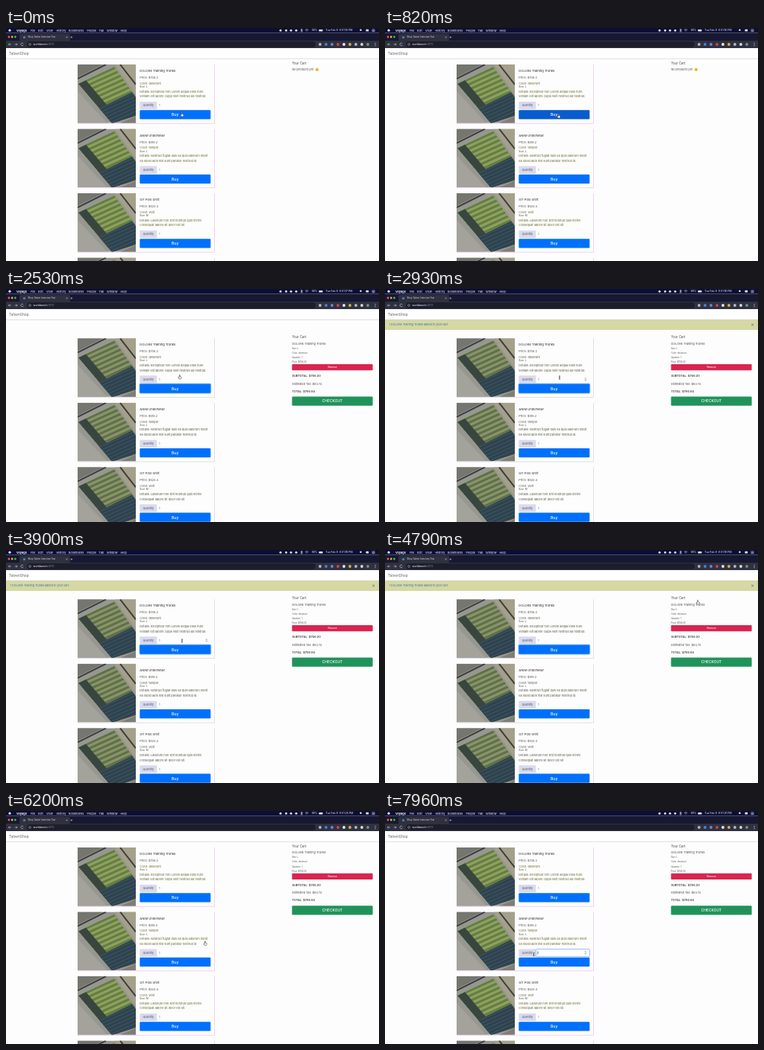
Recreate the animation shown at these times as an HTML page. Size 500 by 313 pixels, loop 8 s.

```html
<!DOCTYPE html>
<html lang="en">
<head>
<meta charset="utf-8">
<title>Shop</title>
<style>
  html, body { margin: 0; width: 100%; height: 100%; overflow: hidden; background: #fdfdfd; }
  svg { display: block; width: 100%; height: 100%; font-family: Inter, Roboto, sans-serif; }
  text { white-space: pre; }
  #page { --edge: #d9d9de; --detail: #575842; --cloth: #87936a; --stripe: #606f45; }
  #page.tinted { --edge: #efc4ee; --detail: #66672f; --cloth: #8ca063; --stripe: #667d3d; }
  .edge { stroke: var(--edge); }
  .detail { fill: var(--detail); }
  .cloth { fill: var(--cloth); }
  .stripe { stroke: var(--stripe); }
</style>
</head>
<body>
<svg id="stage" viewBox="0 0 500 313">
  <defs>
    <clipPath id="frame"><rect width="78" height="78.5"/></clipPath>
    <clipPath id="fabric"><path d="M1 26L49 3L78 44V69L46 79Z"/></clipPath>
    <g id="photo" clip-path="url(#frame)">
      <rect width="78" height="79" fill="#969791"/>
      <path d="M0 0H34L0 17Z" fill="#74766f"/>
      <path d="M50 0H78V40Z" fill="#a5a08a"/>
      <path d="M0 19L38 0M57 0L78 27" stroke="#3d3f3c" stroke-width="2"/>
      <path d="M0 36L40 79H0Z" fill="#a3a29b"/>
      <g clip-path="url(#fabric)">
        <rect class="cloth" width="78" height="79"/>
        <path id="bands" class="stripe" stroke-width="3"/>
        <path d="M1 26L11 21L60 79H46Z" fill="#38463f"/>
        <path d="M24 61L78 35V79H40Z" fill="#2d4352"/>
        <path id="threads" stroke="#4d5d5a" stroke-width=".8"/>
      </g>
      <path d="M57 79L78 70V79Z" fill="#7f7e75"/>
    </g>
  </defs>
  <g id="page"><g id="items"></g><g id="cart"></g></g>
  <g id="alert"></g>
  <g id="bars"></g>
  <g id="pointer"></g>
</svg>
<script>
const LOOP = 8000, SHIFT = 17.3;
const PRODUCT = "DOLORE Training Trunks";
const $ = id => document.getElementById(id);

function add(parent, tag, attrs, content) {
  const el = document.createElementNS("http://www.w3.org/2000/svg", tag);
  for (const key in attrs) el.setAttribute(key, attrs[key]);
  if (content !== undefined) el.textContent = content;
  return parent.appendChild(el);
}
const group = (parent, attrs = {}) => add(parent, "g", attrs);
const rect = (parent, x, y, width, height, fill, more = {}) =>
  add(parent, "rect", { x, y, width, height, fill, ...more });
const dot = (parent, cx, cy, r, fill) => add(parent, "circle", { cx, cy, r, fill });
const line = (parent, d, stroke, width = .6, more = {}) =>
  add(parent, "path", { d, stroke, "stroke-width": width, fill: "none", ...more });
// y is the vertical middle of the capitals
const label = (parent, x, y, words, size = 3.9, fill = "#50504f", more = {}) =>
  add(parent, "text", { x, y: y + size * .36, "font-size": size, fill, ...more }, words);
const centered = { "text-anchor": "middle", "font-weight": 500 };
const show = (el, on) => el.setAttribute("visibility", on ? "visible" : "hidden");
const ramp = (t, start, length) => Math.min(1, Math.max(0, (t - start) / length));

let bands = "", threads = "";
for (let i = 0; i < 14; i++) {
  bands += `M-4 ${8 + i * 7}L82 ${-31 + i * 7}`;
  threads += `M22 ${63 + i * 5}L80 ${37 + i * 5}`;
}
$("bands").setAttribute("d", bands);
$("threads").setAttribute("d", threads);

function spinner(parent, y) {
  return line(parent, `M267.8 ${y - .6}l1 -1.2l1 1.2M267.8 ${y + .6}l1 1.2l1 -1.2`, "#555");
}

function productCard(index, [name, price, color, size, first, second]) {
  const card = group($("items"), { transform: `translate(0 ${49 + index * 86.5})` });
  line(card, "M96 79.2H279.5V0", "", .8, { class: "edge" });
  add(card, "use", { href: "#photo", x: 96, y: 0 });
  label(card, 179.3, 8.6, name, 4.1, "#494949", { "font-weight": 500 });
  label(card, 179.3, 17.6, "Price: " + price);
  label(card, 179.3, 25.5, "Color: " + color, 3.9, "", { class: "detail" });
  label(card, 179.3, 30, "Size: " + size, 3.3);
  label(card, 179.3, 36.2, "Details: " + first, 3.9, "", { class: "detail" });
  label(card, 179.3, 42.8, second, 3.9, "", { class: "detail" });
  rect(card, 179.3, 50, 23, 10.2, "#d9daf0", { rx: .8 });
  label(card, 190.8, 55, "Quantity", 3.7, "#555550", { "text-anchor": "middle" });
  const focus = rect(card, 202.4, 50, 72, 10.2, "#fff", { stroke: "#86b7fe", "stroke-width": .9, rx: .8 });
  const caret = line(card, "M204.6 53v4.4", "#222", .5);
  label(card, 205, 55, "1", 3.7, "", { class: "detail" });
  const arrows = spinner(card, 55);
  const ring = rect(card, 178.3, 60.3, 97, 14.2, "#9cc8ff", { rx: 1.8 });
  const button = rect(card, 179.3, 61.3, 95, 12.2, "#0070fb", { rx: 1.2 });
  label(card, 226.7, 67.5, "Buy", 5.1, "#fff", centered);
  [focus, caret, arrows, ring].forEach(el => show(el, false));
  return { focus, caret, arrows, ring, button };
}

const cards = [
  [PRODUCT, "$706.2", "deserunt", "L", "Excepteur non Lorem aliqua esse irure", "veniam elit labore culpa velit nostrud ad nostrud."],
  ["ANIM Underwear", "$516.2", "tempor", "L", "Nostrud fugiat duis ea quis laborum mollit", "ea eiusd aute nisi sunt pariatur nostrud id."],
  ["SIT Polo Shirt", "$523.4", "velit", "M", "Laborum non sint nostrud quis minim", "consequat labore sit dolor est sit."],
  ["", "", "", "", "", ""]
].map((data, i) => productCard(i, data));

const cart = $("cart");
label(cart, 383.4, 47.6, "Your Cart", 4.3, "#444");
const emptyCart = group(cart);
label(emptyCart, 383.4, 56, "No products yet", 3.8);
dot(emptyCart, 417, 55.8, 2.2, "#f0c64a");
line(emptyCart, "M415.8 56.3q1.2 1.5 2.4 0M416.2 55v.3M417.8 55v.3", "#7d5b20", .4);

const filledCart = group(cart);
label(filledCart, 383.4, 56, PRODUCT, 3.9);
["Size: L", "Color: deserunt", "Quantity: 1", "Price: $706.20"].forEach((words, i) =>
  label(filledCart, 383.4, 62.2 + i * 6.2, words, 2.8));
rect(filledCart, 383.4, 83.8, 108.2, 8.2, "#da2450", { rx: .8 });
label(filledCart, 437.5, 87.9, "Remove", 3.2, "#fff", centered);
label(filledCart, 383.4, 99.4, "SUBTOTAL: $706.20", 3.9, "#3f3f42", { "font-weight": 600 });
label(filledCart, 383.4, 110, "Estimated Tax: $84.74", 3.8);
label(filledCart, 383.4, 120, "TOTAL: $790.94", 3.9, "#3f3f42", { "font-weight": 600 });
rect(filledCart, 383.4, 127.2, 108.2, 12.3, "#20935a", { rx: 1.2 });
label(filledCart, 437.5, 133.4, "CHECKOUT", 4.9, "#fff", centered);

const notice = $("alert");
const noticeBack = rect(notice, 0, 41, 500, 14, "#d6d8a4");
const noticeText = label(notice, 5.5, 48, `1 ${PRODUCT} added to your cart.`, 3.7, "#32789c");
const closeFocus = rect(notice, 485.6, 41.6, 13.6, 12.8, "none", { stroke: "#6d8f9c", "stroke-width": .8, rx: 1 });
line(notice, "M491.2 46.6l2.8 2.8m0 -2.8l-2.8 2.8", "#4b6670", .7);

const bars = $("bars");
rect(bars, 0, 27, 500, 14, "#fff");
rect(bars, 0, 40.8, 500, .7, "#cfcfd2");
label(bars, 4, 34.2, "TalvenShop", 4.8, "#5a5a5a");
rect(bars, 0, 0, 500, 6.5, "#0d0e38");
rect(bars, 0, 6.5, 500, 10.5, "#171831");
rect(bars, 18, 8, 68, 9, "#30313e", { rx: 1.6 });
rect(bars, 0, 17, 500, 10, "#30313e");
rect(bars, 28, 18, 387, 8, "#1d1e2b", { rx: 4 });

dot(bars, 5, 3.2, 1.6, "#eee");
[["Voyage", 14], ["File", 33], ["Edit", 43], ["View", 54], ["History", 67.5], ["Bookmarks", 84],
 ["People", 108.5], ["Tab", 124.5], ["Window", 135], ["Help", 153.5]].forEach(([word, x], i) =>
  label(bars, x, 3.2, word, 3.8, "#f2f2f5", { "font-weight": i ? 400 : 700 }));
[368, 375.5, 382, 389].forEach(x => dot(bars, x, 3.2, 1.5, "#dcdce6"));
line(bars, "M395 1.8l2.4 2.4l-1.2 1.2v-4.4l1.2 1.2l-2.4 2.4M401 2.6q2.2 -1.8 4.4 0M402.2 4q1 -.8 2 0", "#eee", .6);
label(bars, 410, 3.2, "88%", 3.2, "#eee");
rect(bars, 419.5, 2, 5, 2.6, "#eee", { rx: .5 });
const clock = label(bars, 428.5, 3.2, "", 3.5, "#f2f2f5");
dot(bars, 475.5, 2.8, 1.2, "#eee");
rect(bars, 482.5, 1.8, 3.6, 2.8, "#eee", { rx: .6 });
line(bars, "M490.5 2h4M490.5 3.3h4M490.5 4.6h4", "#eee", .6);

["#ef5f56", "#e9b33c", "#42bb4b"].forEach((color, i) => dot(bars, 4 + i * 4.2, 12, 1.4, color));
dot(bars, 24.5, 12.5, 1.6, "#4f7fd0");
label(bars, 29.5, 12.4, "Shop Talven Interview Test", 2.9, "#e4e4ea");
line(bars, "M80.6 11.4l2 2m0 -2l-2 2M86.4 12.4h2.8m-1.4 -1.4v2.8", "#ddd", .5);
line(bars, "M7 22H3.4l1.5 -1.5M3.4 22l1.5 1.5M11.6 22h3.6l-1.5 -1.5M15.2 22l-1.5 1.5M23.2 20.8a1.8 1.8 0 1 0 .2 1.8", "#d6d6de", .6);
add(bars, "circle", { cx: 32, cy: 22, r: 1.4, fill: "none", stroke: "#ccc", "stroke-width": .5 });
const address = label(bars, 36.5, 22, "workbench", 3.6, "#fff");
add(address, "tspan", { fill: "#8d8d98" }, ":4173");
["#b8b8c2", "#4285e0", "#7c7ee0", "#c94657", "#e9e9ee", "#d8b457", "#b9bac6", "#dadae0", "#6b9a73"].forEach((color, i) =>
  dot(bars, 421 + i * 8, 22, 1.9, color));
[20.2, 22, 23.8].forEach(y => dot(bars, 495, y, .55, "#ddd"));

const pointer = $("pointer");
const shapes = {
  hand: line(pointer, "M-1 3.4L-2.2 1.2L-1.5 .7L-.7 1.3V-2Q-.2 -2.7 .3 -2V0L2 .6V2.2L1.4 3.4Z", "#222", .5, { style: "fill:#fff" }),
  beam: line(pointer, "M-1 -2.3q1 0 1 .7v3.2q0 .7 -1 .7M1 -2.3q-1 0 -1 .7v3.2q0 .7 1 .7", "#333", .6)
};

// time, x, y, shape from that time on
const path = [
  [0, 236, 115.5, "hand"], [600, 233, 117.5, "hand"], [2700, 233, 117.5, "beam"],
  [3300, 236, 122, "beam"], [4220, 236, 122, "beam"], [4500, 300, 100, "hand"],
  [5000, 492, 51, "hand"], [5680, 492, 51, "hand"], [6150, 267, 177, "hand"],
  [6500, 267, 177, "beam"], [7250, 199.5, 192.5, "beam"], [LOOP, 199.5, 192.5, "beam"]
];

function movePointer(t) {
  const i = path.findIndex((step, k) => k === path.length - 1 || t < path[k + 1][0]);
  const [start, x, y, shape] = path[i];
  const [end, nextX, nextY] = path[Math.min(i + 1, path.length - 1)];
  const p = ramp(t, start, end - start || 1), eased = p * p * (3 - 2 * p);
  pointer.setAttribute("transform", `translate(${x + (nextX - x) * eased} ${y + (nextY - y) * eased})`);
  for (const name in shapes) show(shapes[name], name === shape);
}

function buyColor(t) {
  if (t >= 2500) return "#0070fb";
  const dark = ramp(t, 80, 150), pressed = ramp(t, 1600, 80);
  return `rgb(${dark * 8}, ${112 - dark * 20 - pressed * 12}, ${251 - dark * 47 - pressed * 32})`;
}

function render(t) {
  const shifted = t >= 2500 && t < 5700;
  $("page").setAttribute("transform", `translate(0 ${shifted ? SHIFT : 0})`);
  $("page").setAttribute("class", shifted ? "" : "tinted");
  show(emptyCart, t < 2500);
  show(filledCart, t >= 2500);

  const cyan = t >= 5030;
  notice.setAttribute("opacity", ramp(t, 2560, 150) * (1 - ramp(t, 5550, 150)));
  noticeBack.setAttribute("fill", cyan ? "#d0fafc" : "#d6d8a4");
  noticeText.setAttribute("fill", cyan ? "#75854a" : "#32789c");
  show(closeFocus, t >= 5350);

  cards[0].button.setAttribute("fill", buyColor(t));
  show(cards[0].ring, t >= 2500 && t < 5350);
  show(cards[0].arrows, t >= 2700 && t < 4300);
  const editing = t >= 7400;
  show(cards[1].focus, editing);
  show(cards[1].arrows, editing);
  show(cards[1].caret, editing);

  clock.textContent = `Tue Feb 9  9:01:${15 + Math.floor((t + 1000) / 1300)} PM`;
  movePointer(t);
}

function tick() {
  render(performance.now() % LOOP);
  requestAnimationFrame(tick);
}
tick();
</script>
</body>
</html>
```
